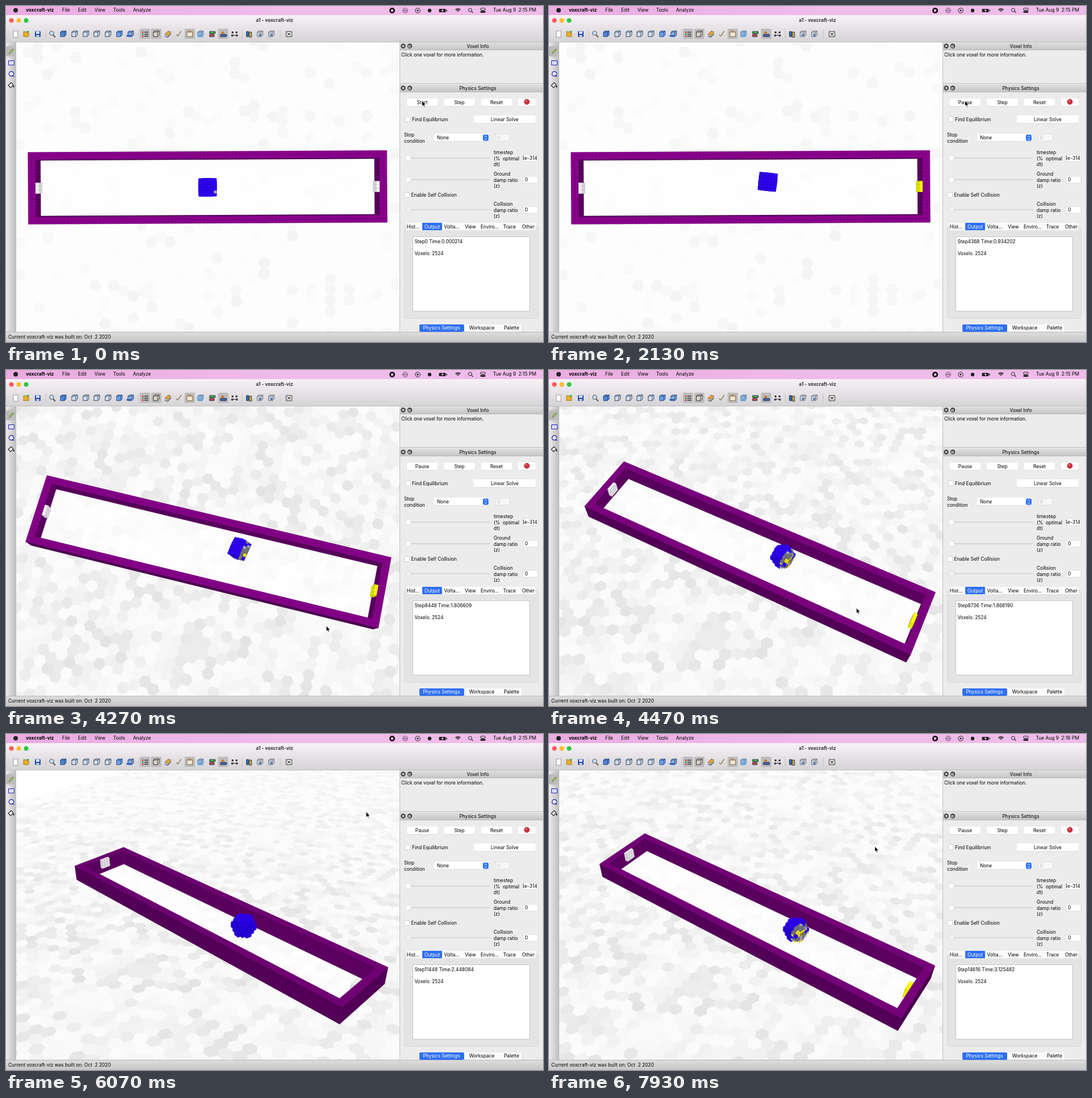
Write an HTML page with a canvas that moves like this. It is 947x592 px and loops after 8000 ms.

```html
<!DOCTYPE html>
<html>
<head>
<meta charset="utf-8">
<style>
html, body { margin: 0; width: 100%; height: 100%; overflow: hidden; background: #fff; }
canvas { display: block; }
</style>
</head>
<body>
<canvas id="stage" width="947" height="592"></canvas>
<script>
const LOOP = 8000, VIEW = { x: 18, y: 64, w: 676, h: 510 };
const stage = document.getElementById('stage').getContext('2d');
let g = stage;

// Each track: [time, ...values], linear between keys.
const CAMERA = [[3950, .3, 0, 355.5, 319.5], [4270, -13.8, 12, 356, 319.5], [4700, -43.8, 58.7, 357, 322],
  [7150, -43.8, 58.7, 357, 322], [7650, -35.5, 47, 356.5, 321.5]];
const CURSOR = [[3500, 733.5, 167], [3900, 587, 468], [3950, 587, 468], [4270, 565, 451], [4700, 516, 383],
  [5250, 516, 383], [5650, 635, 137], [6500, 635, 137], [7000, 561, 181], [7150, 561, 181], [7650, 574.5, 198]];
const STEPS = [[70, 0], [1200, 2400], [3070, 6360], [4270, 8448], [4870, 9336], [6070, 11448], [7930, 14616], [8000, 14736]];
const ROBOT = [[70, 0, 0, 0], [1200, 2.5, 1.05, -4], [3070, 7.25, 2, -9], [4270, 8.5, 2.8, -11],
  [4870, 8.8, 2.9, -11], [6070, 10.3, 3.3, -12], [7930, 13.2, 2.8, -15]];

function track(keys, t) {
  if (t <= keys[0][0]) return keys[0].slice(1);
  const i = keys.findIndex(k => k[0] > t);
  if (i < 0) return keys[keys.length - 1].slice(1);
  const a = keys[i - 1], b = keys[i], f = (t - a[0]) / (b[0] - a[0]);
  return a.slice(1).map((v, n) => v + (b[n + 1] - v) * f);
}
const fract = v => v - Math.floor(v);
const noise = (i, j, k = 0) => fract(Math.sin(i * 127.1 + j * 311.7 + k * 74.7) * 43758.5453);
const rgb = (r, gr, b) => `rgb(${r | 0},${gr | 0},${b | 0})`;

// ---------- 2D helpers ----------
function poly(points, fill, stroke, width = 1, open) {
  g.beginPath();
  points.forEach(p => g.lineTo(p[0], p[1]));
  if (!open) g.closePath();
  if (fill) { g.fillStyle = fill; g.fill(); }
  if (stroke) { g.strokeStyle = stroke; g.lineWidth = width; g.stroke(); }
}
function rect(x, y, w, h, fill, radius = 0, stroke) {
  g.beginPath();
  g.roundRect(x, y, w, h, radius);
  if (fill) { g.fillStyle = fill; g.fill(); }
  if (stroke) { g.strokeStyle = stroke; g.lineWidth = 1; g.stroke(); }
}
function disc(x, y, r, fill, stroke, width = 1) {
  g.beginPath();
  g.arc(x, y, r, 0, 7);
  if (fill) { g.fillStyle = fill; g.fill(); }
  if (stroke) { g.strokeStyle = stroke; g.lineWidth = width; g.stroke(); }
}
function text(str, x, y, { align = 'left', weight = 400, color = '#000' } = {}) {
  g.font = `${weight} 8.4px Inter, "Open Sans", sans-serif`;
  g.textAlign = align;
  g.textBaseline = 'middle';
  g.fillStyle = color;
  g.fillText(str, x, y + .5);
}
function gradient(x0, y0, x1, y1, from, to) {
  const fill = g.createLinearGradient(x0, y0, x1, y1);
  fill.addColorStop(0, from);
  fill.addColorStop(1, to);
  return fill;
}

// ---------- 3D scene ----------
let cam;
function setCamera([yaw, tilt, cx, cy]) {
  const a = yaw * Math.PI / 180, b = tilt * Math.PI / 180;
  cam = { ca: Math.cos(a), sa: Math.sin(a), ct: Math.cos(b), st: Math.sin(b), cx, cy, tilt };
}
function project([x, y, z]) {
  const rx = x * cam.ca - y * cam.sa, ry = x * cam.sa + y * cam.ca;
  const depth = 160.5 + ry * cam.st - z * cam.ct;
  return [cam.cx + 1000 * rx / depth, cam.cy - 1000 * (ry * cam.ct + z * cam.st) / depth, depth];
}
function face(lo, hi, axis, sign, color, { inward = false, place = p => p, grid = 'rgba(20,0,30,.25)' } = {}) {
  const u = (axis + 1) % 3, v = (axis + 2) % 3;
  const at = (a, b) => {
    const p = [];
    p[axis] = (sign > 0 ? hi : lo)[axis];
    p[u] = a; p[v] = b;
    return project(place(p));
  };
  const q = [at(lo[u], lo[v]), at(hi[u], lo[v]), at(hi[u], hi[v]), at(lo[u], hi[v])];
  const area = (q[2][0] - q[0][0]) * (q[3][1] - q[1][1]) - (q[3][0] - q[1][0]) * (q[2][1] - q[0][1]);
  if (area * sign * (inward ? -1 : 1) >= 0) return;
  poly(q, color, color, .4);
  g.beginPath();
  const line = (a, b) => { g.moveTo(a[0], a[1]); g.lineTo(b[0], b[1]); };
  for (let i = lo[u]; i <= hi[u]; i++) line(at(i, lo[v]), at(i, hi[v]));
  for (let i = lo[v]; i <= hi[v]; i++) line(at(lo[u], i), at(hi[u], i));
  g.strokeStyle = grid;
  g.lineWidth = .5;
  g.stroke();
}
function block(lo, hi, top, side, options) {
  for (const axis of [0, 1]) for (const sign of [-1, 1]) face(lo, hi, axis, sign, side, options);
  face(lo, hi, 2, 1, top, options);
}

const floorCanvas = document.createElement('canvas');
floorCanvas.width = 947; floorCanvas.height = 592;
let floorPose = '';
function drawFloor(pose) {
  if (pose.join() !== floorPose) {
    floorPose = pose.join();
    const screen = g;
    g = floorCanvas.getContext('2d');
    rect(0, 0, 947, 592, '#fff');
    const size = 1.8, lit = Math.min(1, cam.tilt / 12);
    const ring = [0, 1, 2, 3, 4, 5].map(n => [size * Math.cos(n * Math.PI / 3), size * Math.sin(n * Math.PI / 3)]);
    for (let i = -48; i <= 48; i++) for (let j = -29; j <= 62; j++) {
      const x = i * size * 1.5, y = (j + (i & 1) / 2) * size * Math.sqrt(3);
      const [sx, sy, depth] = project([x, y, -2.5]);
      if (depth < 40 || sx < 0 || sx > 715 || sy < 45 || sy > 595) continue;
      const shade = noise(i, j);
      const haze = Math.min(1, Math.max(.45, 1.9 - depth / 180));
      const dark = lit * (3 + 24 * shade * shade) * haze + (1 - lit) * (2 + Math.max(0, shade - .82) * 50);
      const level = 255 - dark;
      poly(ring.map(([dx, dy]) => project([x + dx, y + dy, -2.5])), rgb(level, level, level));
    }
    g = screen;
  }
  g.drawImage(floorCanvas, 0, 0);
}

// Rounded 6 x 6 x 6 body: shell cells with the corners taken off.
const CELLS = [], AXIS = [-2.5, -1.5, -.5, .5, 1.5, 2.5], CELL = 5 / 6;
for (const x of AXIS) for (const y of AXIS) for (const z of AXIS) {
  const reach = [x, y, z].map(Math.abs);
  if (Math.max(...reach) === 2.5 && reach[0] + reach[1] + reach[2] < 6) CELLS.push([x, y, z]);
}
const SIGNAL = ['#f2e410', '#74747c', '#858030', '#a9a9b4', '#2a08e0'];

function drawRobot(t, time) {
  const [px, py, turn] = track(ROBOT, t);
  const c = CELL * Math.cos(turn * Math.PI / 180), s = CELL * Math.sin(turn * Math.PI / 180);
  const place = ([x, y, z]) => [px + x * c - y * s, py + x * s + y * c, z * CELL];
  const phase = time % 1.3, active = phase > .42 && phase < .62;
  CELLS.map(cell => [project(place(cell))[2], cell]).sort((a, b) => b[0] - a[0]).forEach(([, [x, y, z]]) => {
    let top = '#3004f2', side = '#2600dc';
    if (active && x > 1) top = side = SIGNAL[Math.floor(noise(x, y, z) * 5)];
    if (t < 70 && x > 2 && y === -1.5) top = '#a9a9b8';
    block([x - .5, y - .5, z - .5], [x + .5, y + .5, z + .5], top, side, { place, grid: 'rgba(10,0,90,.25)' });
  });
}

function drawScene(t, time) {
  const pose = track(CAMERA, t);
  setCamera(pose);
  g.save();
  g.beginPath();
  g.rect(VIEW.x, VIEW.y, VIEW.w, VIEW.h);
  g.clip();
  drawFloor(pose);
  const lo = [-48, -8, -2.5], hi = [48, 8, 2.5];
  poly([[-48, -8], [48, -8], [48, 8], [-48, 8]].map(p => project([...p, -2.5])), 'rgba(255,255,255,.75)');

  const glow = 138 - cam.tilt * .38;
  const top = rgb(glow, 0, glow + 3), side = rgb(86, 0, 90);
  for (const axis of [0, 1]) for (const sign of [-1, 1]) face(lo, hi, axis, sign, rgb(94, 0, 98), { inward: true });

  const leftOn = fract((time - .305) / .8) < .5, rightOn = fract((time - .1) / .8) < .8;
  const lamp = (x, on) => block([x, -1.5, -.5], [x + 1, 1.5, 2.5], on ? '#ffff10' : '#f6f4f6', on ? '#eeee0a' : '#e2dfe4',
    { grid: on ? 'rgba(90,90,0,.4)' : 'rgba(110,100,120,.4)' });
  lamp(-48, leftOn);
  lamp(47, rightOn);
  drawRobot(t, time);

  for (const axis of [0, 1]) for (const sign of [-1, 1]) face([-50, -10, -2.5], [50, 10, 2.5], axis, sign, side);
  [[-50, 8, 50, 10], [-50, -8, -48, 8], [48, -8, 50, 8], [-50, -10, 50, -8]].forEach(([x0, y0, x1, y1]) =>
    face([x0, y0, -2.5], [x1, y1, 2.5], 2, 1, top));
  g.restore();
}

// ---------- Window ----------
function cubeIcon(x, y, fill = '#4f86d8', line = '#1c3d78') {
  poly([[x - 5, y - 3], [x - 2, y - 5], [x + 5, y - 5], [x + 5, y + 2], [x + 2, y + 5], [x - 5, y + 5]], fill, line, .9);
  poly([[x - 5, y - 3], [x + 2, y - 3], [x + 2, y + 5]], null, line, .8, true);
  poly([[x + 2, y - 3], [x + 5, y - 5]], null, line, .8, true);
}
function menuBar(t) {
  rect(0, 0, 947, 16, gradient(0, 0, 500, 0, '#e9abe0', '#efbcea'));
  disc(17, 7.5, 4, '#222');
  text('voxcraft-viz', 35, 7, { weight: 700 });
  [['File', 99], ['Edit', 127], ['View', 156], ['Tools', 189], ['Analyze', 224]].forEach(([s, x]) => text(s, x, 7));
  disc(681, 8, 5, '#111');
  rect(679, 6, 4, 4, '#efbcea');
  disc(704, 8, 4.5, '#cf9fcb', '#8a6788');
  poly([[700, 8], [708, 8]], null, '#8a6788', .8);
  disc(726, 8, 4.3, null, '#222');
  poly([[724.7, 5.8], [728.5, 8], [724.7, 10.2]], '#222');
  disc(747, 8, 3.2, '#222');
  rect(763.5, 5, 12, 6, '#222', 1.5);
  rect(776.5, 6.5, 1.5, 3, '#222');
  poly([[771, 3.5], [767.5, 8.5], [770, 8.5], [768.5, 12.5], [772, 7.5], [769.7, 7.5]], '#efbcea');
  for (const r of [2, 4.2, 6.4]) {
    g.beginPath();
    g.arc(797, 11, r, -2.35, -.79);
    g.strokeStyle = '#222'; g.lineWidth = 1.4; g.stroke();
  }
  disc(818.5, 7, 3, null, '#222');
  poly([[820.8, 9.2], [823.5, 12]], null, '#222', 1.2);
  rect(836.5, 3.8, 9, 3.5, null, 2, '#222');
  rect(836.5, 8.5, 9, 3.5, '#222', 2);
  text(`Tue Aug 9  2:${t < 6500 ? 15 : 16} PM`, 935, 7, { align: 'right' });
}
function toolBar() {
  rect(0, 16, 947, 48, gradient(0, 16, 0, 64, '#f7f1f7', '#d5d3d5'));
  rect(0, 63.4, 947, .6, '#aaa');
  ['#fc5b57', '#f8bd2e', '#2bc840'].forEach((c, i) => disc(9.5 + i * 13, 25.5, 4, c));
  text('a1 - voxcraft-viz', 473.5, 25, { align: 'center', weight: 700, color: '#333' });
  [245, 265, 324, 383].forEach(x => rect(x - 9, 40, 18, 18, '#bdbbbd', 2));
  [70, 233, 416, 483].forEach(x => rect(x, 42, .7, 15, '#bbb'));
  rect(13, 44, 8, 11, '#fff', 0, '#999');
  poly([[31, 54], [31, 45], [35, 45], [36, 47], [40, 47], [40, 54]], '#e8ae22', '#9a7210', .8);
  poly([[36, 44], [41, 44], [39, 48]], '#3faa38');
  rect(51, 44.5, 10, 10, '#254fae', 1);
  rect(53, 45, 6, 4, '#dbe6fa');
  rect(53.5, 51, 5, 3.5, '#ccc');
  disc(80.5, 48, 3.8, '#bfe0f8', '#555');
  poly([[83, 51], [87, 55]], null, '#555', 2);
  cubeIcon(101, 49);
  [121, 141, 160, 180].forEach(x => cubeIcon(x, 49, '#cfdef2', '#234'));
  cubeIcon(200, 49, '#69a2e8');
  cubeIcon(220, 49, '#8aaed8');
  rect(212.5, 51, 9, 3, '#3369c0');
  [45, 48.5, 52].forEach((y, i) => {
    rect(240, y, 2.5, 2.5, ['#d33', '#3a3', '#d33'][i]);
    rect(244, y + .5, 7, 1.4, '#333');
  });
  cubeIcon(265, 49, '#dcd8cd', '#222');
  poly([[280, 50], [286, 44], [291, 46], [285, 52]], '#e6a428', '#654', .8);
  poly([[280, 53], [285, 55], [291, 49]], null, '#444', 1.3, true);
  poly([[300, 50], [303, 53], [309, 44]], null, '#998a60', 1.6, true);
  rect(319, 46, 10, 8, '#f2e8d2', 0, '#76623c');
  poly([[319, 45], [323, 43], [329, 45]], '#b88a48');
  cubeIcon(343, 49, '#95b7da', '#5078a8');
  rect(340, 50, 7, 5, '#6ca4dc');
  rect(359, 45, 10, 3.5, '#47b344', 0, '#234');
  rect(359, 50, 8, 4, '#d8443c', 0, '#234');
  rect(378, 50, 11, 4, '#3e66b4', 1, '#234');
  disc(382, 47.5, 2.5, '#bf7630');
  rect(398, 45, 3, 3, '#222');
  rect(405, 45, 3, 3, '#222');
  poly([[397, 51.5], [409, 51.5]], null, '#333', 1.2);
  disc(399, 52, 2, '#444');
  disc(407, 52, 2, '#444');
  rect(424, 45, 4, 9, '#3268b8', 0, '#234');
  rect(429, 46, 4, 9, '#d7b23c', 0, '#234');
  cubeIcon(448, 49, '#ccd0d8', '#667');
  cubeIcon(468, 49, '#ccd0d8', '#667');
  rect(446, 49, 4, 4, '#5a80b4');
  rect(466, 49, 4, 4, '#5a80b4');
  rect(494, 45, 10, 9, '#fff', 0, '#222');
  poly([[496, 47], [502, 52]], null, '#222', 1);
  poly([[502, 47], [496, 52]], null, '#222', 1);
}
function sideBar() {
  rect(0, 64, 18, 510, gradient(0, 0, 18, 0, '#ececec', '#bcbcbc'));
  rect(0, 71, 18, 18, '#bcbcbc', 2);
  for (let x = 5; x < 14; x += 3) rect(x, 69, 1, 1, '#888');
  poly([[5, 85], [6, 81], [12, 75], [14, 77], [8, 83]], '#8ac23c', '#777', .7);
  rect(4.5, 96.5, 10, 7.5, '#dcdcf4', 0, '#2020b8');
  disc(9.5, 119.5, 4.2, '#e4e4f0', '#2626a8', 1.2);
  poly([[11, 122], [14, 124.5]], null, '#2626a8', 1.5);
  poly([[4, 140], [9, 135], [13, 139], [8, 144]], '#eee', '#222', 1.1);
  disc(13.5, 142, 1.4, '#222');
}
function panelTitle(y, label) {
  rect(695, y, 252, 14, gradient(0, y, 0, y + 14, '#e0e0e0', '#c4c4c4'));
  rect(695, y + 13.5, 252, .6, '#aaa');
  disc(700.5, y + 6.5, 4.2, '#444');
  poly([[698.8, y + 4.8], [702.2, y + 8.2]], null, '#fff', 1.1);
  poly([[702.2, y + 4.8], [698.8, y + 8.2]], null, '#fff', 1.1);
  disc(712, y + 6.5, 4.2, '#444');
  rect(710, y + 5.5, 3, 3, null, 0, '#fff');
  text(label, 832, y + 7, { align: 'center' });
}
function button(label, x, y, w) {
  rect(x, y + .8, w, 13.5, '#cfcfcf', 3);
  rect(x, y, w, 13.5, '#fff', 3);
  text(label, x + w / 2, y + 6.5, { align: 'center' });
}
function checkBox(label, x, y) {
  rect(x - 4.5, y - 4.5, 9, 9, '#fff', 2, '#d0d0d0');
  text(label, x + 7.5, y);
}
function slider(y, lines, value, knob = '#fff') {
  rect(705, y - 1, 149, 2, '#d6d6d6', 1);
  disc(709.5, y, 4.8, knob, '#cfcfcf', .7);
  lines.forEach((s, i) => text(s, 860, y - 10 + i * 10.5));
  rect(912, y - 6, 26, 12, '#fff', 0, '#dcdcdc');
  g.save();
  g.beginPath();
  g.rect(912, y - 6, 26, 12);
  g.clip();
  if (value === '0') text(value, 915, y);
  else text(value, 937, y, { align: 'right' });
  g.restore();
}
function panel(running, step, time) {
  rect(694, 64, 253, 510, '#ececec');
  rect(694, 64, .8, 510, '#b5b5b5');
  panelTitle(64, 'Voxel Info');
  text('Click one voxel for more information.', 697, 86);
  rect(695, 136, 252, .8, '#aaa');
  panelTitle(138, 'Physics Settings');
  button(running ? 'Pause' : 'Start', 707, 163, 54);
  button('Step', 772, 163, 55);
  button('Reset', 838, 163, 54);
  button('', 903, 163, 31);
  disc(918.5, 168.8, 4.6, '#d2303a', '#8e1e26', .7);
  disc(917.3, 167, 1.5, '#ee8086');
  checkBox('Find Equilibrium', 708.5, 199.5);
  button('Linear Solve', 825, 193, 109);
  text('Stop', 702, 227);
  text('condition', 702, 238);
  button('', 755, 225, 97);
  text('None', 760, 232);
  rect(841, 226.5, 10, 11, '#2f72f4', 2.5);
  poly([[844, 230.8], [846, 228.7], [848, 230.8]], null, '#fff', 1, true);
  poly([[844, 233.2], [846, 235.3], [848, 233.2]], null, '#fff', 1, true);
  rect(863, 226, 25, 12, '#f7f7f7', 0, '#dedede');
  text('0', 866, 232, { color: '#bbb' });
  slider(268, ['timestep', '(%  optimal', 'dt)'], '4e-314');
  slider(306, ['Ground', 'damp ratio', '(z)'], '0');
  checkBox('Enable Self Collision', 707, 333);
  slider(359, ['Collision', 'damp ratio', '(z)'], '0', '#f1f1f1');

  rect(702.5, 388.5, 236, 162, '#e4e4e4', 3, '#dadada');
  rect(706, 382, 228, 13, '#fbfbfb', 3);
  rect(734, 382, 35, 13, '#2f70f3', 1);
  [['Hist...', 718], ['Volta...', 786], ['View', 819], ['Enviro...', 853], ['Trace', 888], ['Other', 921]]
    .forEach(([s, x]) => text(s, x, 388.5, { align: 'center' }));
  text('Output', 751.5, 388.5, { align: 'center', color: '#fff' });
  rect(717.5, 406.5, 206, 131, '#fff', 0, '#c6c6c6');
  text(`Step${step} Time:${time.toFixed(6)}`, 720.5, 414.5);
  text('Voxels: 2524', 720.5, 435.5);

  rect(729, 561, 180, 13, '#fbfbfb', 3);
  rect(729, 561, 79, 13, '#2f70f3', 2);
  text('Physics Settings', 768, 567, { align: 'center', color: '#fff' });
  text('Workspace', 839, 567, { align: 'center' });
  text('Palette', 891.5, 567, { align: 'center' });
}
function statusBar() {
  rect(0, 574, 947, 18, gradient(0, 574, 0, 592, '#dedede', '#c6c6c6'));
  rect(0, 574, 947, .7, '#aaa');
  text('Current voxcraft-viz was built on: Oct  2 2020', 4, 583);
}
function cursor([x, y]) {
  poly([[0, 0], [0, 9.5], [2.2, 7.6], [3.7, 11], [5.2, 10.3], [3.8, 7.1], [6.8, 7]].map(([a, b]) => [x + a, y + b]), '#000', '#fff', .7);
}

function frame(now) {
  const t = now % LOOP;
  const step = Math.round(track(STEPS, t)[0] / 24) * 24;
  const time = (step + 1) * .00021382514;
  drawScene(t, time);
  menuBar(t);
  toolBar();
  sideBar();
  panel(t >= 70, step, time);
  statusBar();
  cursor(track(CURSOR, t));
  requestAnimationFrame(frame);
}
requestAnimationFrame(frame);
</script>
</body>
</html>
```
